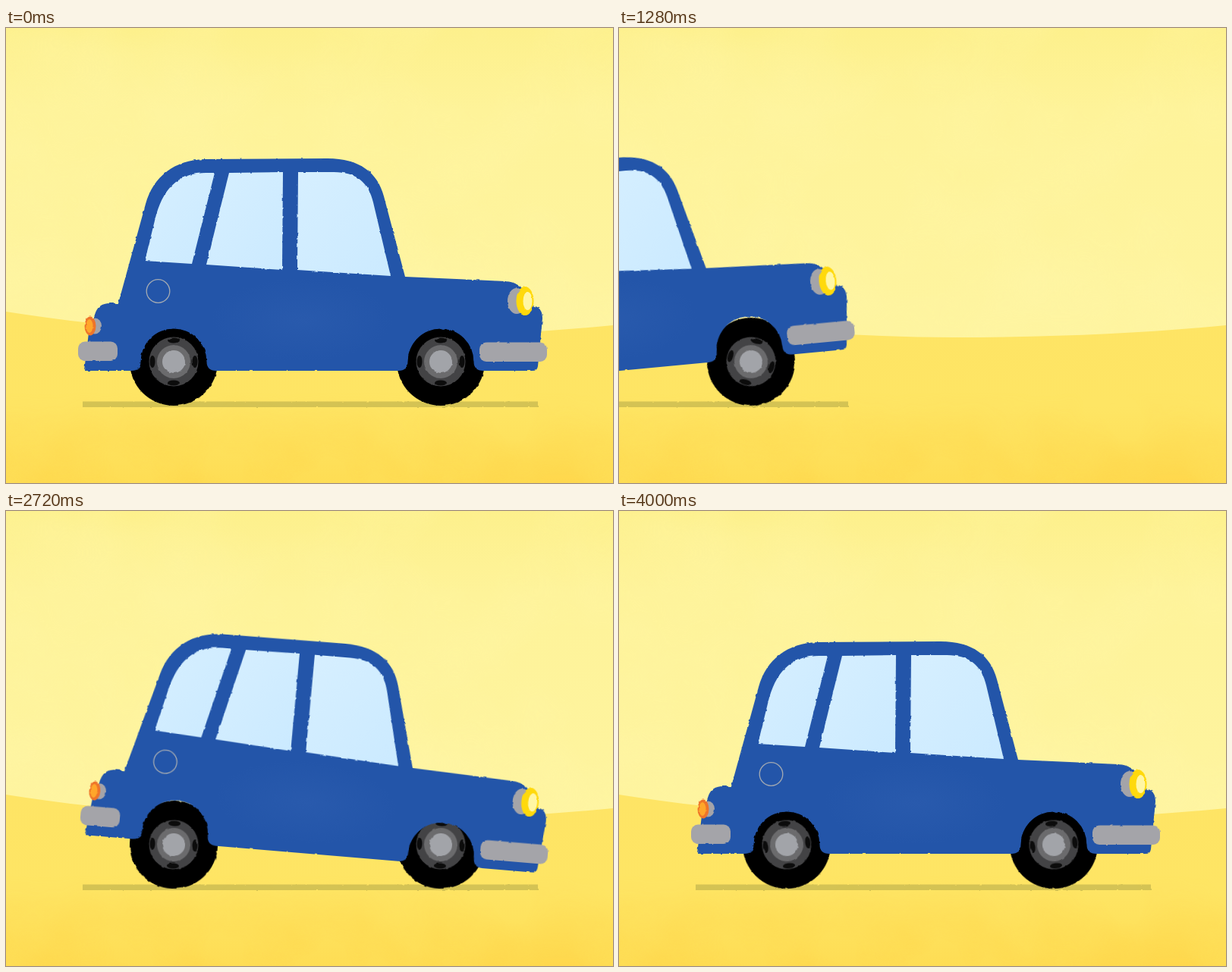
These frames come from a looping animation (800 px wide and 600 px high, 4040 ms). An HTML page without scripts:

```html
<!DOCTYPE html>
<html lang="en">
<head>
<meta charset="utf-8">
<title>Blue car</title>
<style>
  html, body { margin: 0; width: 100%; height: 100%; overflow: hidden; background: #fef296; }
  svg { display: block; width: 100%; height: 100%; }

  .drive, .tilt, .spin { animation: 4040ms linear infinite; }
  .drive { animation-name: drive; }
  .spin { animation-name: spin; transform-origin: 0 0; }
  .tilt {
    animation-name: tilt;
    animation-timing-function: cubic-bezier(.3333, 0, .6667, 1);
    transform-origin: 400px 452px;
  }

  /* cubic ease-in off the right edge, cubic ease-out from the left */
  @keyframes drive {
    0% { transform: translateX(0); animation-timing-function: cubic-bezier(.3333, 0, .6667, 0); }
    24.49%, 25% { transform: translateX(720px); }
    25.01%, 25.82% { transform: translateX(-720px); animation-timing-function: cubic-bezier(.3333, 1, .6667, 1); }
    58.79%, 100% { transform: translateX(0); }
  }
  @keyframes spin {
    0% { transform: rotate(0deg); animation-timing-function: cubic-bezier(.3333, 0, .6667, 0); }
    24.49%, 25% { transform: rotate(648deg); }
    25.01%, 25.82% { transform: rotate(-648deg); animation-timing-function: cubic-bezier(.3333, 1, .6667, 1); }
    58.79%, 100% { transform: rotate(0deg); }
  }
  /* squat while speeding up, dive while braking */
  @keyframes tilt {
    0%, 100% { transform: rotate(0deg); }
    28.22% { transform: rotate(-5.7deg); }
    63.37% { transform: rotate(4.95deg); }
  }
</style>
</head>
<body>
<svg viewBox="0 0 800 600" preserveAspectRatio="none">
  <defs>
    <linearGradient id="sky" x2="0" y2="1">
      <stop offset="0" stop-color="#fdf08c"/>
      <stop offset=".18" stop-color="#fef399"/>
      <stop offset=".68" stop-color="#fef49f"/>
    </linearGradient>
    <linearGradient id="ground" x2="0" y2="1">
      <stop offset="0" stop-color="#fee465"/>
      <stop offset=".55" stop-color="#fee564"/>
      <stop offset="1" stop-color="#fedd54"/>
    </linearGradient>
    <linearGradient id="low" x2="0" y2="1">
      <stop offset=".8" stop-color="#000"/>
      <stop offset="1" stop-color="#fff"/>
    </linearGradient>
    <linearGradient id="glass" x2="1" y2="1">
      <stop offset="0" stop-color="#d6efff"/>
      <stop offset="1" stop-color="#cbeaff"/>
    </linearGradient>
    <radialGradient id="sheen">
      <stop offset="0" stop-color="#3a69b8" stop-opacity=".25"/>
      <stop offset="1" stop-color="#3a69b8" stop-opacity="0"/>
    </radialGradient>
    <mask id="bottom"><rect width="800" height="600" fill="url(#low)"/></mask>

    <!-- torn paper edge -->
    <filter id="rough" x="-5%" y="-5%" width="110%" height="110%" color-interpolation-filters="sRGB">
      <feTurbulence type="fractalNoise" baseFrequency=".15" numOctaves="2" seed="4"/>
      <feDisplacementMap in="SourceGraphic" scale="2.5" xChannelSelector="R" yChannelSelector="G"/>
    </filter>
    <!-- soft watercolour blotches -->
    <filter id="pale" x="0" y="0" width="1" height="1" color-interpolation-filters="sRGB">
      <feTurbulence type="fractalNoise" baseFrequency=".007" numOctaves="3" seed="8"/>
      <feColorMatrix values="0 0 0 0 1  0 0 0 0 .97  0 0 0 0 .69  1.4 0 0 0 -.5"/>
    </filter>
    <filter id="amber" x="0" y="0" width="1" height="1" color-interpolation-filters="sRGB">
      <feTurbulence type="fractalNoise" baseFrequency=".009" numOctaves="3" seed="3"/>
      <feColorMatrix values="0 0 0 0 1  0 0 0 0 .83  0 0 0 0 .28  2.4 0 0 0 -.8"/>
    </filter>

    <g id="wheel">
      <g class="spin">
        <g filter="url(#rough)">
          <circle r="58"/>
          <circle r="32.5" fill="#434345"/>
          <g id="slots" fill="#0c0c0c">
            <ellipse cy="-28" rx="8" ry="3.5"/>
            <ellipse cy="28" rx="8" ry="3.5"/>
          </g>
          <use href="#slots" transform="rotate(90)"/>
          <circle r="22" fill="#6b6b6d"/>
          <circle r="15" fill="#a2a4a9"/>
        </g>
      </g>
    </g>
  </defs>

  <rect width="800" height="600" fill="url(#sky)"/>
  <rect width="800" height="420" filter="url(#pale)" opacity=".4"/>
  <path d="M0 374C110 392 280 407 440 408C580 408 700 402 800 392V600H0Z" fill="url(#ground)"/>
  <g mask="url(#bottom)"><rect width="800" height="600" filter="url(#amber)" opacity=".55"/></g>

  <g class="drive">
    <path d="M101 492.5H701V500H101Z" fill="#5a5f28" opacity=".25" filter="url(#rough)"/>

    <use href="#wheel" x="221" y="440"/>
    <use href="#wheel" x="573" y="440"/>

    <g class="tilt">
      <g filter="url(#rough)">
        <path fill="#2355a9" d="M103 452L109 402L117 378Q121 363 137 363H148L184 232
          C194 196 222 174 262 173L424 172C466 172 490 191 498 222L526 328L658 334
          Q674 335 681 344L694 366Q707 368 707 383L701 446Q700 452 694 452
          H629Q616.5 452 616.5 440A43.5 43.5 0 0 0 529.5 440Q529.5 452 517 452
          H277Q264.5 452 264.5 440A43.5 43.5 0 0 0 177.5 440Q177.5 452 165 452Z"/>
        <ellipse cx="390" cy="385" rx="120" ry="55" fill="url(#sheen)"/>
        <g fill="url(#glass)">
          <path d="M183 307L196 254C206 212 226 192 262 191H275L245 311Z"/>
          <path d="M294 191L365 190L364 319L264 312Z"/>
          <path d="M385 190H432C462 190 478 204 484 230L507 327L384 319Z"/>
        </g>
      </g>
      <circle cx="200.5" cy="347" r="15.3" fill="none" stroke="#a5abb2" stroke-width="1.3"/>

      <g fill="#a4a4a9" filter="url(#rough)">
        <ellipse cx="117" cy="393" rx="9" ry="10.5"/>
        <ellipse cx="673" cy="360" rx="12" ry="17"/>
        <rect x="95" y="413.5" width="52" height="25.5" rx="9"/>
        <rect x="624" y="414.5" width="89" height="25.5" rx="9"/>
        <ellipse cx="111" cy="393" rx="7.5" ry="12.5" fill="#ee7429"/>
        <ellipse cx="110" cy="393" rx="4.5" ry="9" fill="#ffa62a"/>
        <ellipse cx="684" cy="360" rx="11.5" ry="19" fill="#ffd90c"/>
        <ellipse cx="687.5" cy="360" rx="6" ry="12" fill="#fff6a4"/>
      </g>
    </g>
  </g>
</svg>
</body>
</html>
```
